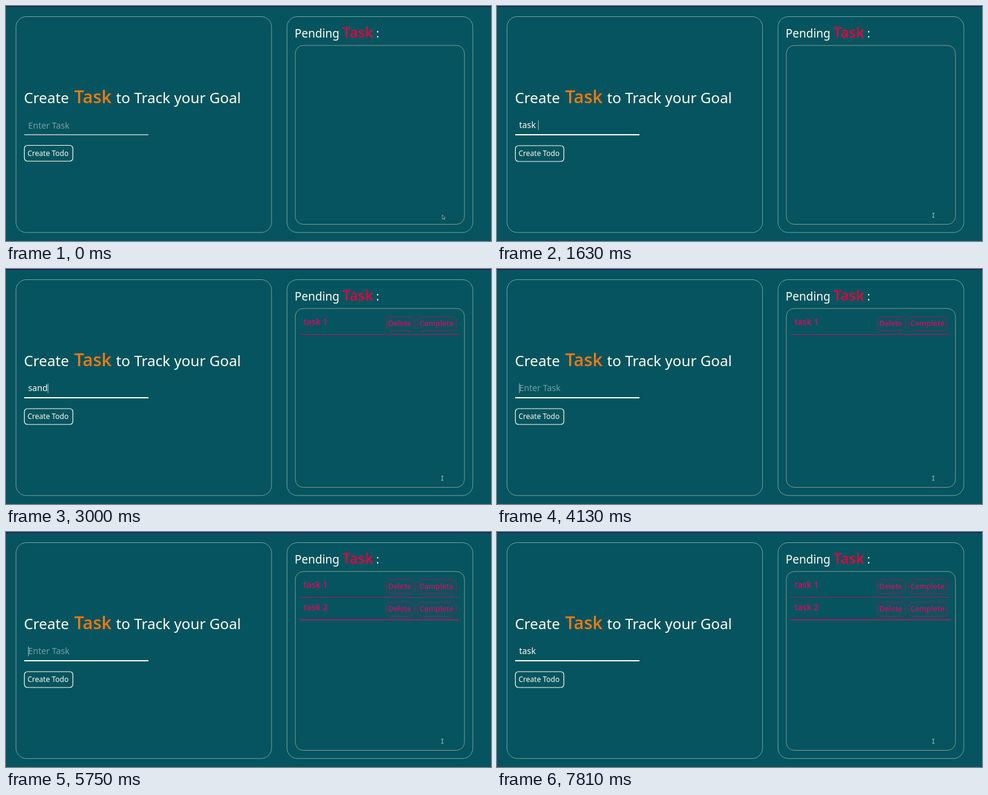
An HTML page for the animation above (8 s loop, 800x387 px).

```html
<!DOCTYPE html>
<html lang="en">
<head>
<meta charset="utf-8">
<title>Task tracker</title>
<style>
  html, body { margin: 0; width: 100%; height: 100%; overflow: hidden; background: #05545f; }
  svg { display: block; width: 800px; height: 387px; }
  text { font-family: "Noto Sans", "Open Sans", sans-serif; fill: #fffdf0; white-space: pre; }
  .strong { font-family: "Open Sans", "Noto Sans", sans-serif; font-weight: 600; }
  .panel { fill: none; stroke: #7ba09f; }
  .list { fill: none; stroke: #849984; }
  .button { fill: none; stroke: #fffdf0; stroke-width: 1.2; }
  .row text { fill: #df0860; font-size: 12.1px; }
  .row .name { font-size: 14px; }
  .row rect { fill: none; stroke: #a2185a; }
  .row path { stroke: #a51a5c; stroke-width: 1.2; }
  #row2 path { stroke: #cf0c60; stroke-width: 1.5; }
</style>
</head>
<body>
<svg viewBox="0 0 800 387">
  <rect width="800" height="387" fill="#05545f"/>
  <rect width="800" height="1.2" fill="#2a104e"/>
  <rect class="panel" x="16.5" y="17.5" width="421.5" height="355.5" rx="17"/>
  <rect class="panel" x="463.5" y="17.5" width="306.5" height="355.5" rx="17"/>
  <rect class="list" x="477.2" y="65" width="279" height="294.5" rx="13"/>

  <g font-size="24.2">
    <text x="29.5" y="160">Create</text>
    <text class="strong" x="112.5" y="160" font-size="29" style="fill:#f3790f">Task</text>
    <text x="181.5" y="160">to Track your Goal</text>
  </g>
  <g font-size="19">
    <text x="476" y="52">Pending</text>
    <text class="strong" x="555" y="52" font-size="24" style="fill:#e6003c">Task</text>
    <text x="610.5" y="52">:</text>
  </g>

  <text id="field" x="36.5" font-size="14.2"></text>
  <path id="caret" d="M0 188.5V204.5" stroke="#a9c2c2"/>
  <path id="underline" d="M30 212H235"/>
  <g id="create">
    <rect class="button" x="30.3" y="230" width="80" height="26" rx="5"/>
    <text x="35.5" y="247.3" font-size="12">Create Todo</text>
  </g>

  <g id="row1" class="row">
    <text class="name strong" x="490.5" y="91.5">task 1</text>
    <rect x="627" y="78.5" width="46.5" height="23" rx="7"/>
    <text class="strong" x="630.5" y="94.2">Delete</text>
    <rect x="678.8" y="78.5" width="64" height="23" rx="7"/>
    <text class="strong" x="682" y="94.2">Complete</text>
    <path d="M484 107.6H748"/>
  </g>
  <g id="row2" class="row" transform="translate(0 37)">
    <text class="name strong" x="490.5" y="91.5">task 2</text>
    <rect x="627" y="78.5" width="46.5" height="23" rx="7"/>
    <text class="strong" x="630.5" y="94.2">Delete</text>
    <rect x="678.8" y="78.5" width="64" height="23" rx="7"/>
    <text class="strong" x="682" y="94.2">Complete</text>
    <path d="M484 107.6H748"/>
  </g>

  <path id="arrow" d="M719.7 344v7l1.7-1.4 1.2 2.4 1-.5-1.1-2.3h2.1z" fill="#173b42" stroke="#b9c4bd" stroke-width=".7"/>
  <path id="beam" d="M717.8 341.2h3.8M717.8 348h3.8M719.7 341.2v6.8" fill="none" stroke="#a9c0be"/>
</svg>
<script>
  const LOOP = 8000, FOCUS = 60, BLINK = 500;
  const FIRST_ADDED = 2000, SECOND_ADDED = 5630;

  // Each edit: time in ms and the field's value from then on.
  const edits = [
    [0, ""],
    [1190, "t"], [1250, "ta"], [1310, "tas"], [1380, "task"], [1630, "task "], [1810, "task 1"],
    [FIRST_ADDED, ""],
    [2440, "s"], [2810, "sa"], [2870, "san"], [3000, "sand"],
    [3190, "san"], [3310, "sa"], [3630, "s"], [3690, ""],
    [4500, "t"], [4690, "ta"], [4880, "tas"], [5130, "task"], [5190, "task "], [5250, "task 2"],
    [SECOND_ADDED, ""],
    [6380, "t"], [6690, "ta"], [7060, "tas"], [7310, "task"]
  ];

  const $ = id => document.getElementById(id);
  const field = $("field"), caret = $("caret"), underline = $("underline");
  const show = (id, on) => $(id).setAttribute("visibility", on ? "visible" : "hidden");

  function draw(t) {
    const focused = t >= FOCUS;
    const [since, value] = edits.findLast(([start]) => start <= t);

    field.textContent = value || "Enter Task";
    field.style.fill = value ? "#fffdf0" : "#769fa3";
    field.setAttribute("y", focused ? 201.3 : 202);
    const caretX = 37 + (value ? field.getComputedTextLength() : 0);
    caret.setAttribute("transform", `translate(${caretX} 0)`);
    show("caret", focused && Math.floor((t - since) / BLINK) % 2 === 0);

    underline.setAttribute("stroke", focused ? "#fffdf0" : "#c3d0cd");
    underline.setAttribute("stroke-width", focused ? 2 : 1.3);
    $("create").setAttribute("transform", `translate(0 ${focused ? 0 : -0.5})`);

    show("row1", t >= FIRST_ADDED);
    show("row2", t >= SECOND_ADDED);
    show("arrow", !focused);
    show("beam", focused);
  }

  const begin = performance.now();
  function tick() {
    draw((performance.now() - begin) % LOOP);
    requestAnimationFrame(tick);
  }
  tick();
</script>
</body>
</html>
```
